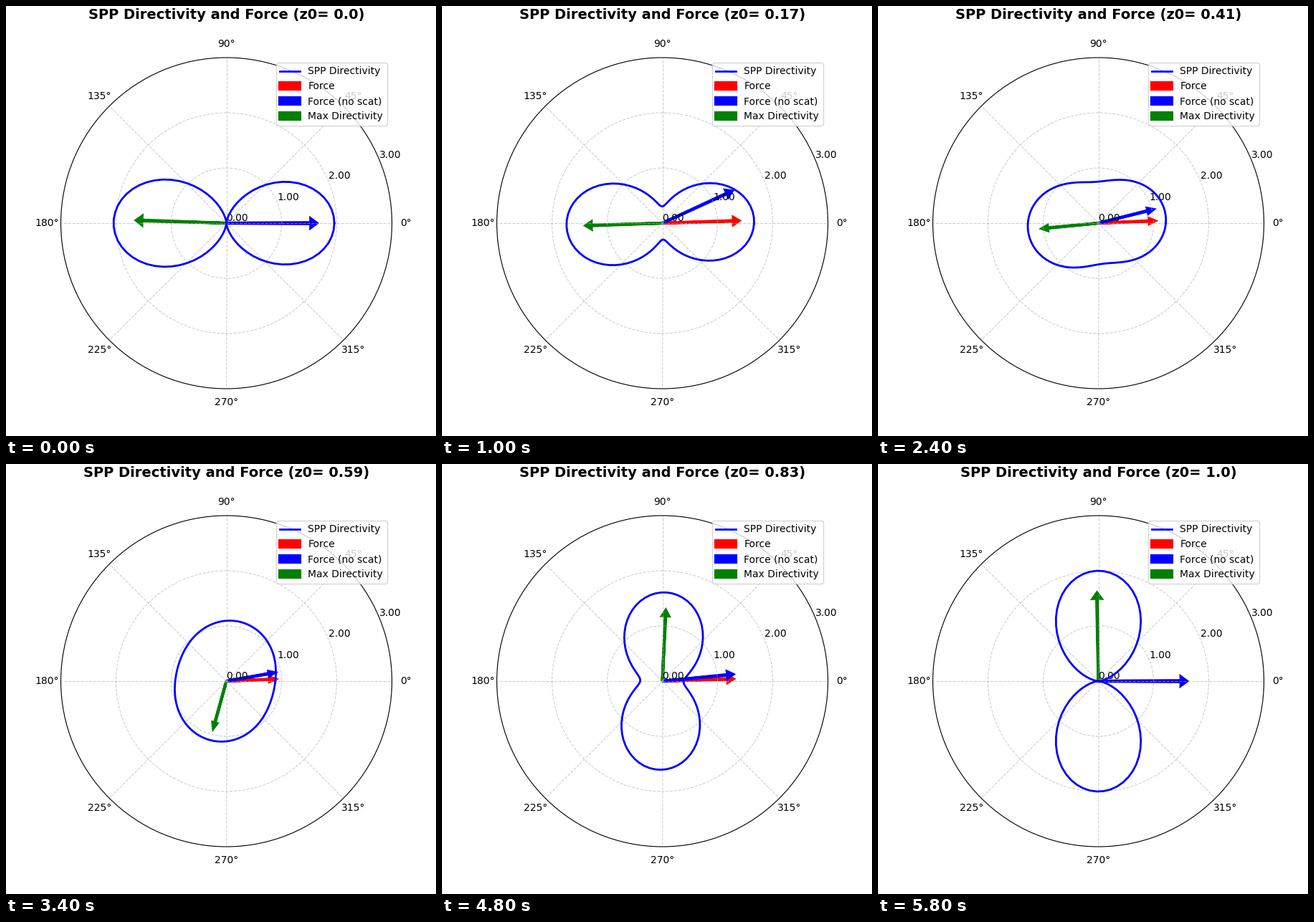
A matplotlib script for the animation above (6 s loop, 600 px wide and 600 px high).

```python
import matplotlib.pyplot as plt
import numpy as np
from matplotlib.animation import FuncAnimation
from matplotlib.patches import FancyArrow

FRAMES = 30
INTERVAL = 200
HEAD = 0.1

theta = np.linspace(0, 2 * np.pi, 100)


def directivity(z):
    """Radiation pattern of an elliptic dipole, normalised to a mean of one."""
    a2, b2 = 1 - z, 0.85 * z
    ab = np.sqrt(a2 * b2)
    c, s = np.cos(theta), np.sin(theta)
    power = a2 * (c - 0.011) ** 2 + b2 * s**2 + ab * s * (0.1 * c + 0.002)
    return np.maximum(power / ((a2 + b2) / 2), 0)


def force_angles(z):
    """Force direction with and without the scattered field."""
    cross = np.sqrt(z * (1 - z))
    return np.arctan2(0.083 * cross, 1), np.arctan2(0.21 * cross, z)


fig, ax = plt.subplots(figsize=(6, 6), dpi=100,
                       subplot_kw={"projection": "polar"})
curve, = ax.plot(theta, directivity(0), color="blue", lw=2,
                 label="SPP Directivity")
ax.set_ylim(0, 3)
ax.set_autoscale_on(False)
ax.set_yticks(range(4), labels=[f"{r:.2f}" for r in range(4)])
ax.grid(True, linestyle="--", alpha=0.6)


def add_arrow(color, label):
    arrow = FancyArrow(0, 0, 0, 1, width=0.01, head_width=HEAD,
                       head_length=HEAD, length_includes_head=True,
                       color=color, lw=3, label=label)
    return ax.add_patch(arrow)


arrows = [
    add_arrow("red", "Force"),
    add_arrow("blue", "Force (no scat)"),
    add_arrow("green", "Max Directivity"),
]
ax.legend(loc="upper right")
title = fig.text(0.5125, 582 / 600, "", ha="center", va="baseline",
                 fontsize=14, fontweight="bold")


def update(i):
    z = i / (FRAMES - 1)
    r = directivity(z)
    curve.set_ydata(r)
    peak = theta[np.argmax(np.round(r, 9))]
    for arrow, angle in zip(arrows, (*force_angles(z), peak)):
        arrow.set_data(x=angle, y=0, dx=0, dy=0.8 * r.max())
    title.set_text(f"SPP Directivity and Force (z0= {round(z, 2)})")
    return [curve, title, *arrows]


anim = FuncAnimation(fig, update, frames=FRAMES, interval=INTERVAL,
                     repeat=True, repeat_delay=0)
plt.show()
```
